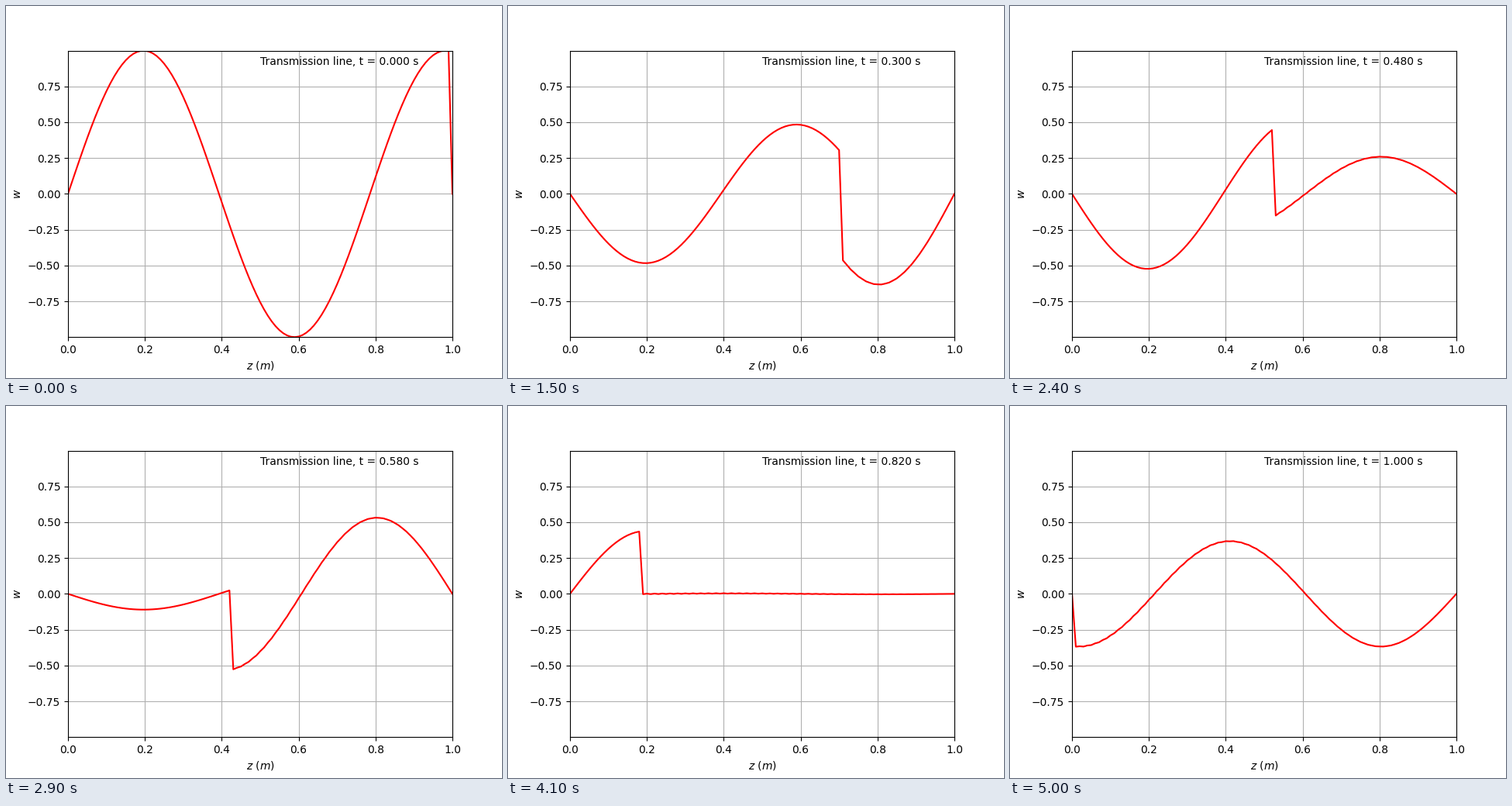
Recreate the animation shown at these times as a matplotlib script. Size 640 by 480 pixels, loop 5050 ms.

```python
import numpy as np
import matplotlib.pyplot as plt
from matplotlib.animation import FuncAnimation

# Damped wave w_tt + 2 k w_t + k^2 w = c^2 w_zz on 0 <= z <= 1, fixed ends
CELLS = 100
STEPS = 100
DT = 0.01
K = 1.0
C = 1.0

z = np.linspace(0, 1, CELLS + 1)
start = np.sin(8 * z)


def force(w):
    """Step-scaled spring and wave terms at the inner points."""
    courant = (C * DT * CELLS) ** 2
    bend = w[2:] - 2 * w[1:-1] + w[:-2]
    return courant * bend - (K * DT) ** 2 * w[1:-1]


def solve():
    """Central differences in time, starting from rest."""
    rows = np.zeros((STEPS + 1, CELLS + 1))
    rows[0, 1:-1] = start[1:-1]
    rows[1, 1:-1] = start[1:-1] + force(start) / 2
    d = K * DT
    for n in range(1, STEPS):
        now, old = rows[n], rows[n - 1]
        rows[n + 1, 1:-1] = (2 * now[1:-1] - (1 - d) * old[1:-1]
                             + force(now)) / (1 + d)
    return rows


waves = solve()

fig, ax = plt.subplots(figsize=(6.4, 4.8), dpi=100)
ax.set_xlim(0, 1)
ax.set_ylim(start.min(), start.max())
ax.set_xlabel(r"$z\ (m)$")
ax.set_ylabel("$w$")
ax.grid(True)
line, = ax.plot(z, waves[0], "r", lw=1.5)
label = ax.text(0.5, 0.9, "")


def update(n):
    line.set_ydata(waves[n])
    label.set_text(f"Transmission line, t = {n * DT:.3f} s")
    return line, label


anim = FuncAnimation(fig, update, frames=STEPS + 1, interval=50,
                     init_func=lambda: update(0), repeat=True,
                     repeat_delay=0)
plt.show()
```
